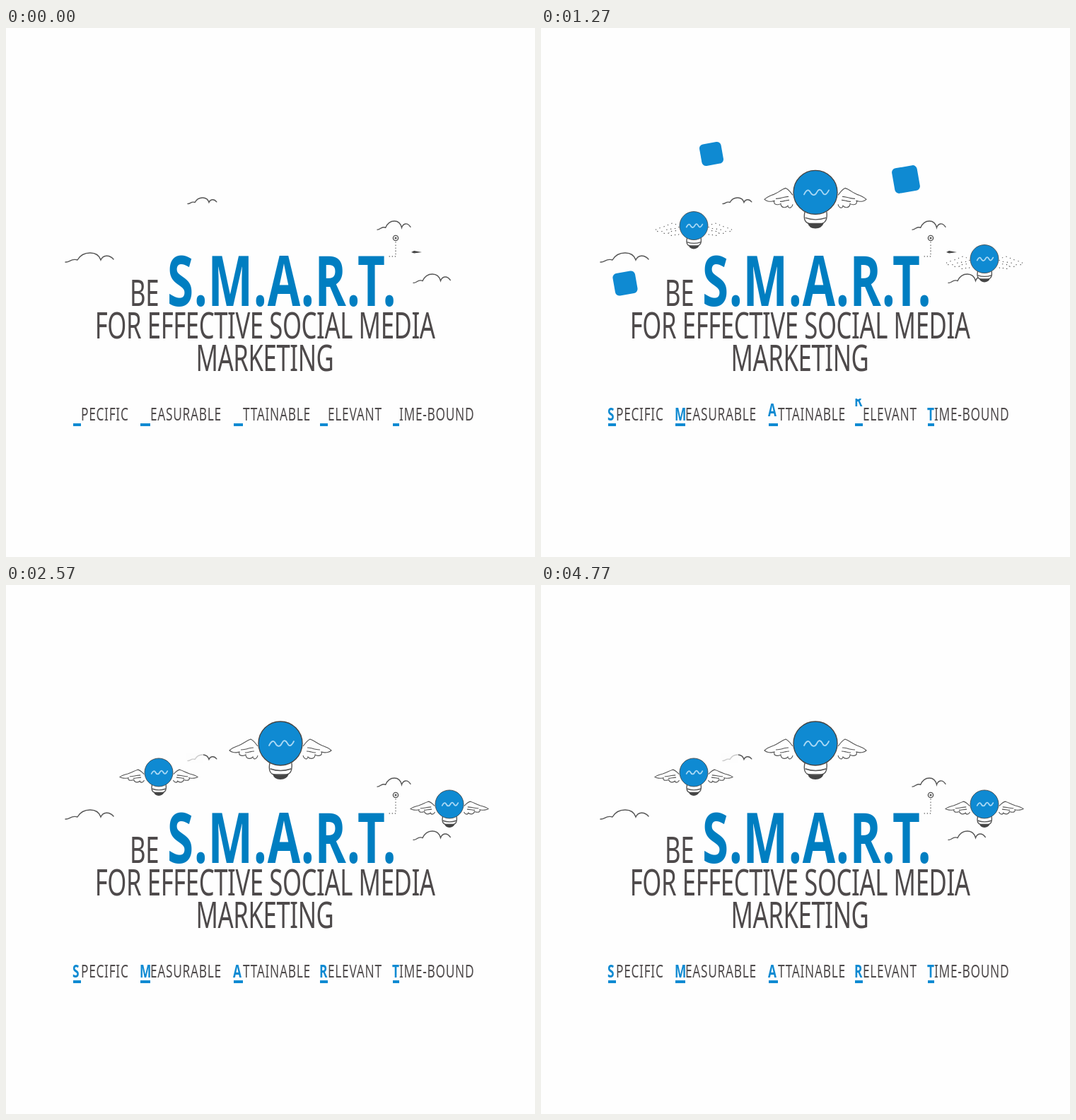
An HTML page that plays this animation: 748x748 px, repeating every 5010 ms.

```html
<!DOCTYPE html>
<html lang="en">
<head>
<meta charset="utf-8">
<title>Be S.M.A.R.T.</title>
<style>
  html, body { margin: 0; height: 100%; overflow: hidden; background: #fefefe; }
  svg { display: block; width: 100%; height: 100%; }
  /* one condensed face for all text */
  text {
    font-family: "Noto Sans", sans-serif; fill: #4e4a4b;
    transform: scaleX(.68); transform-box: fill-box; transform-origin: left;
  }
  .line { font-size: 51px; letter-spacing: -.6px; }
  .middle { text-anchor: middle; transform-origin: center; }
  .smart { font-size: 99px; font-weight: 700; fill: #007ec1; letter-spacing: 1px; }
  .word { font-size: 25.5px; letter-spacing: 1px; }
  .initial { font-size: 25.5px; font-weight: 700; fill: #0f8ad2; }
  .blue { fill: #0f8ad2; }
  .ink { fill: none; stroke: #555; stroke-width: 1.4; stroke-linecap: round; vector-effect: non-scaling-stroke; }
  .wing { fill: none; stroke: #555; stroke-width: 1.1; vector-effect: non-scaling-stroke; }
  .base { fill: #fefefe; }
  .glow { stroke: #a9d8f4; stroke-width: 1.8; }
</style>
</head>
<body>
<svg viewBox="0 0 748 748">
  <defs>
    <path id="cloud" class="ink" d="M0 13C6 14 8 7 17 10C21 3 28 0 35 0C43 0 48 4 50 10C53 3 62 2 68 9"/>
    <path id="wing" class="wing" d="M0 4C3 0 6 -4 10 -6C16 -4 20 0 27 3C33 5 37 7 40 10C35 14 30 13 26 12C28 17 22 19 17 16C17 22 10 23 7 19C6 24 1 22 0 17M6 6C12 6 17 9 24 9M5 11C10 11 13 13 18 13"/>
    <clipPath id="window"><path d="M80 524H680V570H80Z"/></clipPath>
  </defs>
  <g id="clouds"></g>
  <path id="veil" fill="#fefefe" d="M254 237H279V252H254Z"/>
  <g class="ink">
    <circle cx="551" cy="297" r="3.6"/>
    <circle cx="551" cy="297" r=".8"/>
    <path d="M551 303V323H539" stroke-dasharray=".1 4"/>
  </g>
  <path id="pen" d="M573 317L577 315L588 317L577 318.500Z" fill="#444"/>
  <text class="line" x="175" y="393">BE</text>
  <text class="smart" x="228" y="393">S.M.A.R.T.</text>
  <text class="line middle" x="366" y="439">FOR EFFECTIVE SOCIAL MEDIA</text>
  <text class="line middle" x="366" y="485">MARKETING</text>
  <g id="words"></g>
  <g id="initials" clip-path="url(#window)"></g>
  <g id="icons"></g>
  <g id="bulbs"></g>
</svg>
<script>
const LOOP = 5010;
const $ = id => document.getElementById(id);
const fill = (id, items, draw) => {
  $(id).innerHTML = items.map(draw).join("");
  return [...$(id).children];
};
const span = (t, start, length) => Math.min(1, Math.max(0, (t - start) / length));
const backOut = (u, kick) => 1 + (kick + 1) * (u - 1) ** 3 + kick * (u - 1) ** 2;

// x, y, scale x, scale y
fill("clouds", [[84, 318, 1, 1], [257, 240, .6, .65], [525, 273, .69, .93], [576, 348, .77, .95]],
  ([x, y, sx, sy]) => `<use href="#cloud" transform="translate(${x} ${y}) scale(${sx} ${sy})"/>`);

// initial, rest, x of initial, x of rest
const words = [["S", "PECIFIC", 95, 106], ["M", "EASURABLE", 190, 204], ["A", "TTAINABLE", 322, 335],
  ["R", "ELEVANT", 444, 455], ["T", "IME-BOUND", 547, 556]];
fill("words", words, ([, rest, x, restX]) => `<text class="word" x="${restX}" y="555">${rest}</text>
  <rect class="blue" x="${x}" y="559" width="${restX - x}" height="4"/>`);
const initials = fill("initials", words, ([letter, , x]) =>
  `<g><text class="initial" x="${x - 1}" y="555">${letter}</text></g>`);

// start, length and kick describe the first pop
const marks = [
  { x: 241, y: 178, size: 31, start: 100, length: 400, kick: 3.6 },
  { x: 516, y: 214, size: 36, start: 600, length: 400, kick: 3.4 },
  { x: 119, y: 361, size: 32, start: 570, length: 200, kick: 0 }
];
const icons = fill("icons", marks, ({ size }) =>
  `<rect class="blue" x="${-size / 2}" y="${-size / 2}" width="${size}" height="${size}" rx="6"/>`);

const lamps = [
  { x: 388, y: 224, scale: 1, wing: 1, pop: 30, popLength: 370, flap: 760, drop: 60, riseEnd: 2130, power: 2.2 },
  { x: 216, y: 265, scale: .645, wing: 1.33, pop: 860, popLength: 300, flap: 1060, drop: 114, riseEnd: 2300, power: 2.6 },
  { x: 627, y: 310, scale: .645, wing: 1.33, pop: 420, popLength: 800, flap: 1060, drop: 152, riseEnd: 2300, power: 2.8 }
];
const bulbs = fill("bulbs", lamps, ({ wing }) => `<g>
  <use href="#wing" transform="translate(32) scale(${wing} 1)"/>
  <use href="#wing" transform="translate(-32) scale(${-wing} 1)"/>
  <path class="ink base" d="M-15 28C-17 38 -14 43 -9 44H9C14 43 17 38 16 28"/>
  <path class="ink" d="M-14 36Q0 41 15 36"/>
  <path d="M-11 43Q0 46 12 43Q9 51 0 51Q-9 51 -11 43Z" fill="#444"/>
  <circle class="blue" r="31" stroke="#444" stroke-width="1.3"/>
  <path class="ink glow" d="M-16 3C-12 -5 -9 -4 -7 0S-1 6 2 0S8 -4 10 0S15 5 19 -3"/>
</g>`);

// Each initial enters from below, swings above its line and settles.
const letterOffset = age => age < 100
  ? 16 * (1 - age / 100)
  : -20 * Math.sin(Math.PI * span(age, 100, 200));

// The icons pop up once with a kick, then blink in and out every 1100 ms.
function iconScale({ start, length, kick }, i, t) {
  const beat = (t - 770) % 1100;
  const leave = 1 - span(beat, 500 + i * 30, 140) ** 2;
  if (t < start) return 0;
  if (t < 1470) return backOut(span(t, start, length), kick) * (t < 770 ? 1 : leave);
  return backOut(span(beat, i * 50, 180), 0) * leave;
}

function draw() {
  const t = performance.now() % LOOP;
  initials.forEach((el, i) => {
    const age = t - 810 - i * 90;
    el.setAttribute("visibility", age < 0 ? "hidden" : "visible");
    el.setAttribute("transform", `translate(0 ${letterOffset(age)})`);
  });
  icons.forEach((el, i) => {
    const { x, y } = marks[i];
    el.setAttribute("transform", `translate(${x} ${y}) rotate(-10) scale(${iconScale(marks[i], i, t)})`);
  });
  bulbs.forEach((el, i) => {
    const { x, y, scale, pop, popLength, flap, drop, riseEnd, power } = lamps[i];
    const grown = scale * span(t, pop, popLength) ** 1.5;
    const rise = drop * (1 - span(t, 30, riseEnd - 30)) ** power;
    const drawn = span(t, flap, 450) ** 2;
    el.setAttribute("transform", `translate(${x} ${y + rise}) scale(${grown})`);
    for (const wing of el.querySelectorAll("use")) {
      wing.setAttribute("stroke-dasharray", `${6 * drawn} ${6 - 6 * drawn}`);
      wing.setAttribute("visibility", drawn ? "visible" : "hidden");
    }
  });
  const passing = span(t, 1800, 250);
  $("veil").setAttribute("opacity", .7 * passing);
  $("pen").setAttribute("opacity", 1 - passing);
  requestAnimationFrame(draw);
}
draw();
</script>
</body>
</html>
```
